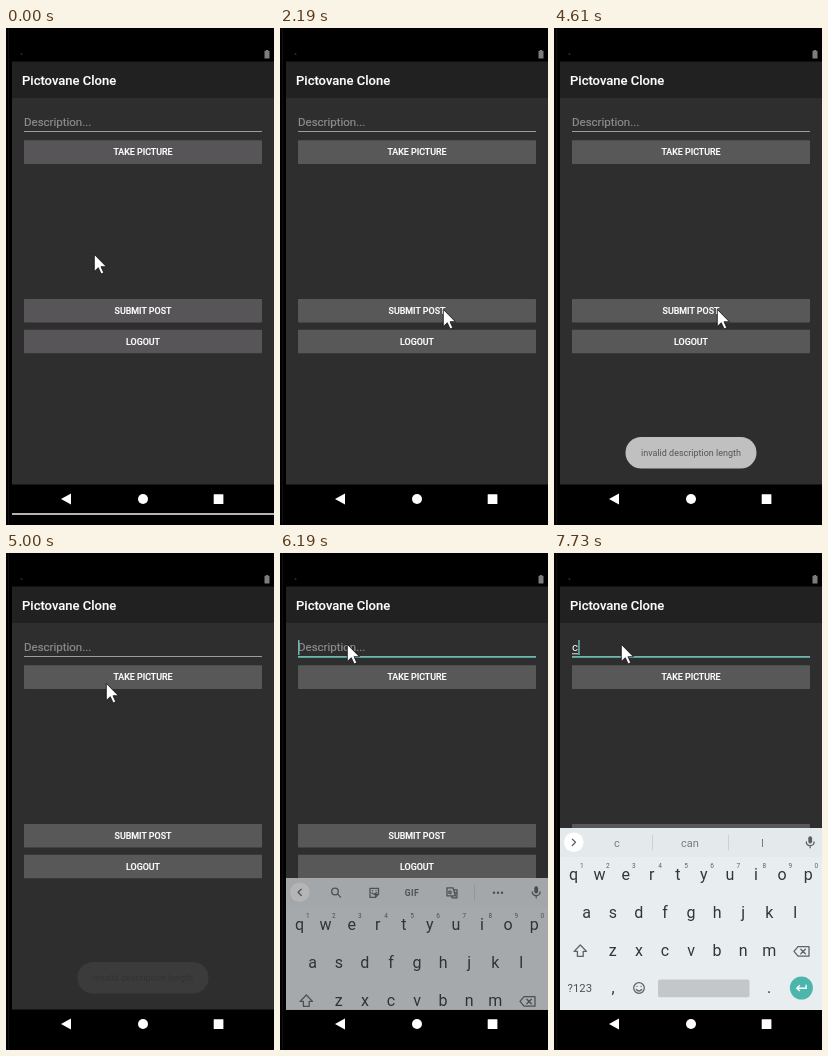
An HTML page for the animation above (8 s loop, 268 by 497 pixels).

```html
<!DOCTYPE html>
<html lang="en">
<head>
<meta charset="utf-8">
<title>Post form</title>
<style>
  html, body { margin: 0; width: 100%; height: 100%; overflow: hidden; background: #000; }
  svg { display: block; width: 100vw; height: 100vh; }
  text { font-family: Roboto, Inter, sans-serif; }

  .title { font-size: 13px; font-weight: 500; fill: #fff; stroke: #fff; stroke-width: .15; }
  .label { font-size: 8.9px; font-weight: 500; fill: #fff; stroke: #fff; stroke-width: .2; text-anchor: middle; }
  .field { font-size: 11.5px; }
  .hint { fill: #8d8d8d; stroke: #8d8d8d; stroke-width: .2; }
  .key { font-size: 16px; fill: #30373c; text-anchor: middle; }
  .digit { font-size: 6.5px; fill: #5c6368; text-anchor: middle; }
  .word { font-size: 11px; fill: #777d82; text-anchor: middle; }
  .icon { fill: none; stroke: #5c6469; stroke-width: 1.3; stroke-linejoin: round; stroke-linecap: round; }

  /* Everything shares one 8 s clock and changes in hard steps. */
  .anim { animation: 8s step-end infinite; }
  #cursor { animation-name: move; }
  #buttons { animation-name: tint; }
  #edge { animation-name: edge; }
  #ripple { animation-name: press; }
  #toast { animation-name: toast; }
  #focus { animation-name: focus; }
  #caret { animation-name: blink; }
  #keyboard { animation-name: rise; }
  .before { animation-name: before; }
  .after { animation-name: after; }

  @keyframes move {
    0% { transform: translate(88px, 226px); }
    7.75% { transform: translate(98px, 190px); }
    9.25% { transform: translate(118px, 132px); }
    10.75% { transform: translate(133px, 87px); }
    12.625% { transform: translate(135px, 79px); }
    14.5% { transform: translate(165px, 332px); }
    16.375% { transform: translate(175px, 400px); }
    17.875% { transform: translate(181px, 440px); }
    19.375% { transform: translate(178px, 453px); }
    20.875% { transform: translate(165px, 390px); }
    22.375% { transform: translate(154px, 317px); }
    24.25% { transform: translate(158px, 300px); }
    25.875% { transform: translate(162px, 286px); }
    27.375% { transform: translate(163px, 281px); }
    59.5% { transform: translate(150px, 243px); }
    61% { transform: translate(124px, 181px); }
    62.5% { transform: translate(100px, 130px); }
    64% { transform: translate(83px, 101px); }
    65.875% { transform: translate(75px, 91px); }
    67.5% { transform: translate(71px, 87px); }
    72.5%, 100% { transform: translate(67px, 91px); }
  }
  @keyframes tint {
    0% { fill: #575558; }
    1.5%, 100% { fill: #585858; }
  }
  @keyframes edge {
    0% { opacity: 1; }
    1.5%, 100% { opacity: 0; }
  }
  @keyframes press {
    0% { opacity: 0; transform: scale(.9); }
    30.5% { opacity: .16; transform: scale(.9); }
    32.25% { opacity: .12; transform: scale(1.2); }
    33.75%, 100% { opacity: 0; transform: scale(1.2); }
  }
  @keyframes toast {
    0% { opacity: 0; }
    33.75% { opacity: .35; }
    35.625% { opacity: .8; }
    37.375% { opacity: 1; }
    57.625% { opacity: .87; }
    59.5% { opacity: .55; }
    61% { opacity: .27; }
    62.5% { opacity: .08; }
    64%, 100% { opacity: 0; }
  }
  @keyframes focus {
    0% { opacity: 0; }
    72.5%, 100% { opacity: 1; }
  }
  @keyframes blink {
    0% { opacity: 0; }
    74% { opacity: 1; }
    80.75% { opacity: 0; }
    87.75% { opacity: 1; }
    94.75%, 100% { opacity: 0; }
  }
  @keyframes rise {
    0% { opacity: 0; transform: translateY(110px); }
    77.375% { opacity: .65; transform: translateY(50px); }
    78.875% { opacity: .98; transform: translateY(.5px); }
    80.75%, 100% { opacity: 1; transform: none; }
  }
  @keyframes before {
    0% { opacity: 1; }
    96.625%, 100% { opacity: 0; }
  }
  @keyframes after {
    0% { opacity: 0; }
    96.625%, 100% { opacity: 1; }
  }
</style>
</head>
<body>
<svg viewBox="0 0 268 497">
  <defs>
    <clipPath id="submitClip"><rect x="18" y="271" width="238" height="23.5" rx="1"/></clipPath>
    <clipPath id="appClip"><rect x="6" y="33.5" width="262" height="423"/></clipPath>
  </defs>

  <rect width="268" height="497"/>
  <rect x="2" width="1" height="497" fill="#0f0f0f"/>
  <circle cx="15.5" cy="26" r="1" fill="#2c2c2c"/>
  <path d="M260 22h2v.8h1.5v7.7h-5v-7.7h1.5z" fill="#7d7d7d"/>

  <rect x="6" y="33.5" width="262" height="36.5" fill="#212121"/>
  <rect x="6" y="70" width="262" height="386.5" fill="#2e2e2e"/>
  <text class="title" x="16" y="57">Pictovane Clone</text>

  <text class="field hint anim before" x="18" y="98.4">Description...</text>
  <rect x="18" y="103" width="238" height="1" fill="#9c9c9c"/>
  <rect id="focus" class="anim" x="18" y="103" width="238" height="1.8" fill="#6db5ae"/>
  <rect id="caret" class="anim" x="18" y="87" width="1.5" height="15" fill="#6db5ae"/>
  <g class="anim after">
    <text class="field" x="18" y="98.4" fill="#fff">c</text>
    <rect x="18" y="100.3" width="6" height="1" fill="#e6e6e6"/>
    <rect x="24.2" y="87" width="1.5" height="15" fill="#6db5ae"/>
  </g>

  <g id="buttons" class="anim">
    <rect x="18" y="112.2" width="238" height="23.8" rx="1"/>
    <rect x="18" y="271" width="238" height="23.5" rx="1"/>
    <rect x="18" y="301.8" width="238" height="23.5" rx="1"/>
  </g>
  <g clip-path="url(#submitClip)">
    <g transform="translate(144.5 283)"><circle id="ripple" class="anim" r="121" fill="#fff"/></g>
  </g>
  <text class="label" x="137" y="127.4">TAKE PICTURE</text>
  <text class="label" x="137" y="286">SUBMIT POST</text>
  <text class="label" x="137" y="316.8">LOGOUT</text>

  <g id="toast" class="anim">
    <rect x="71.5" y="409" width="131" height="31.5" rx="15.7" fill="#d7d7d7"/>
    <text x="137" y="428" font-size="9" fill="#5b5b5b" text-anchor="middle">invalid description length</text>
  </g>

  <g clip-path="url(#appClip)">
    <g id="keyboard" class="anim">
      <rect x="6" y="275" width="262" height="182" fill="#e8edf0"/>
      <rect x="6" y="275" width="262" height="29" fill="#e4e9ec"/>
      <circle cx="19.8" cy="289.3" r="9.8" fill="#fff"/>

      <g class="icon anim before">
        <path d="M21.3 286.1l-3.2 3.2 3.2 3.2"/>
        <circle cx="55" cy="288.5" r="3.3"/>
        <path d="M57.6 291.1l3 3"/>
        <path d="M90 285.3h8.5v6l-3 3H90zM98.5 291.3h-3v3M92 289.8q2 2.6 4.4 0M92.5 287.6h.1M96 287.6h.1"/>
        <path d="M167 284.8h6l2.5 8H167zM171 288.3q-2.3-.8-2.3 1t2.3 1v-.9M173.5 286.8h3.5v8h-5l-.5-2M174 289.8h2.5"/>
        <path d="M194.5 282v15" stroke="#ccd1d4" stroke-width="1"/>
        <text x="132" y="292.8" font-size="8.5" font-weight="700" fill="#5c6469" stroke="none" text-anchor="middle" letter-spacing=".5">GIF</text>
        <g fill="#5c6469" stroke="none">
          <circle cx="214" cy="289.7" r="1.2"/><circle cx="218" cy="289.7" r="1.2"/><circle cx="222" cy="289.7" r="1.2"/>
        </g>
      </g>
      <g class="anim after">
        <path class="icon" d="M18.3 286.1l3.2 3.2-3.2 3.2"/>
        <path d="M98.5 282v15M174.5 282v15" stroke="#ccd1d4"/>
        <text class="word" x="63" y="293.5">c</text>
        <text class="word" x="136" y="293.5">can</text>
        <text class="word" x="208.5" y="293.5">I</text>
      </g>
      <rect x="254.3" y="283.3" width="3.8" height="7.2" rx="1.9" fill="#566066"/>
      <path class="icon" d="M252.3 288.8q0 3.8 3.9 3.8t3.9-3.8M256.2 292.8v2"/>

      <g id="keys"></g>
      <path class="icon" d="M26.3 392l6.2 6.4h-3.3v5h-5.8v-5h-3.3z"/>
      <path class="icon" d="M244 393.7h11v9.5h-11l-4-4.75zM246.8 396.2l4.6 4.6M251.4 396.2l-4.6 4.6"/>
      <text x="25.8" y="439.3" font-size="11.3" fill="#4a5257" text-anchor="middle">?123</text>
      <text class="key" x="59" y="439.8">,</text>
      <g class="icon">
        <circle cx="85" cy="435" r="5.3"/>
        <path d="M82.4 436.5q2.6 3 5.2 0M83 433.3h.1M87 433.3h.1"/>
      </g>
      <rect x="104" y="426.5" width="91.5" height="17.8" rx="2" fill="#c3c7ca"/>
      <text class="key" x="215" y="439.8">.</text>
      <circle cx="247.4" cy="435" r="11.5" fill="#4db6ac"/>
      <path d="M252.1 431.8v3.4h-9M245.8 432.3l-3 2.9 3 2.9" fill="none" stroke="#fff" stroke-width="1.4"/>
    </g>
  </g>

  <g fill="#fff">
    <path d="M55 471l10-5.5v11z"/>
    <circle cx="137" cy="471" r="5"/>
    <rect x="207.7" y="466.3" width="9.7" height="9.7" rx=".5"/>
    <rect id="edge" class="anim" x="6" y="485.3" width="262" height="1.4"/>
  </g>

  <path id="cursor" class="anim" fill="#fff" stroke="#111" stroke-width=".8" d="M.3.4v17l4-3.7 2.8 6.2 2.7-1.1-2.8-6.1h5.4z"/>
</svg>
<script>
  const keys = document.getElementById("keys");

  function put(cls, x, y, label) {
    const el = document.createElementNS("http://www.w3.org/2000/svg", "text");
    el.setAttribute("class", cls);
    el.setAttribute("x", x);
    el.setAttribute("y", y);
    el.textContent = label;
    keys.append(el);
  }

  function row(letters, x, y) {
    [...letters].forEach((c, i) => put("key", x + i * 26.07, y, c));
  }

  row("qwertyuiop", 19.5, 327.2);
  row("asdfghjkl", 32.7, 364.6);
  row("zxcvbnm", 58.8, 403);
  [..."1234567890"].forEach((c, i) => put("digit", 27.8 + i * 26.07, 315.3, c));
</script>
</body>
</html>
```
